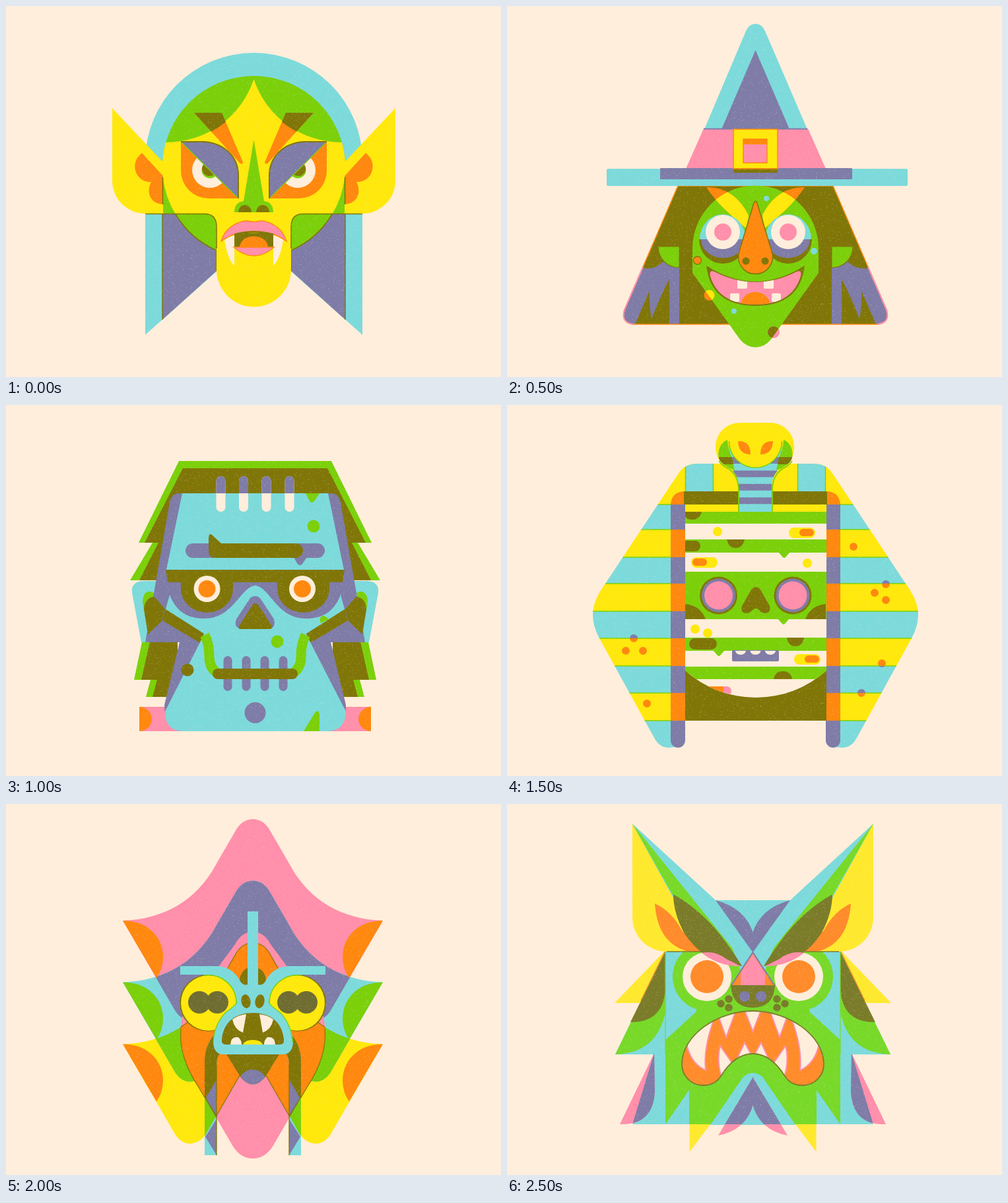
Animation of 750x563 px, one loop 3000 ms. Source, as an HTML page with a canvas:

```html
<!DOCTYPE html>
<html lang="en">
<head>
<meta charset="utf-8">
<title>Monster masks</title>
<style>
html, body { margin: 0; width: 100%; height: 100%; overflow: hidden; background: #ffeedb; }
canvas { display: block; }
</style>
</head>
<body>
<canvas id="stage" width="750" height="563"></canvas>
<script>
const g = document.getElementById('stage').getContext('2d');
const W = 750, H = 563, HOLD = 500;
const cream = '#ffeedb', cyan = '#7ddadb', yellow = '#ffe80c', pink = '#ff8fab';
const orange = '#ff880f', green = '#7bd00a', violet = '#7f7ca8', olive = '#807608';

const asPath = d => typeof d === 'string' ? new Path2D(d) : d;
const fill = (color, d) => { g.fillStyle = color; g.fill(asPath(d)); };
const line = (color, width, d) => { g.strokeStyle = color; g.lineWidth = width; g.stroke(asPath(d)); };
const oval = (color, x, y, rx, ry = rx, turn = 0) => {
  g.fillStyle = color;
  g.beginPath();
  g.ellipse(x, y, rx, ry, turn, 0, 7);
  g.fill();
};
const box = (color, x, y, x2, y2, r = 0) => {
  g.fillStyle = color;
  g.beginPath();
  g.roundRect(x, y, x2 - x, y2 - y, r);
  g.fill();
};
const pill = (color, x, y, x2, y2) => box(color, x, y, x2, y2, Math.min(x2 - x, y2 - y) / 2);
const within = (d, draw) => { g.save(); g.clip(asPath(d)); draw(); g.restore(); };
const both = (axis, draw) => {
  draw();
  g.save();
  g.translate(axis * 2, 0);
  g.scale(-1, 1);
  draw();
  g.restore();
};

function vampire() {
  const ax = 375.5;
  fill(cyan, 'M211 499V235A164.5 164 0 0 1 540 235V499L431 402H320Z');
  both(ax, () => {
    fill(violet, 'M237 245V476L319 402V300Z');
    line(olive, 1.5, 'M237 316V476M319 368V402');
  });
  oval(green, ax, 244.5, 138.5);
  both(ax, () => {
    line(olive, 1.5, 'M256.3 315A138.5 138.5 0 0 0 320 371.4');
    fill(green, 'M237 240H260V315H237Z');
    fill(yellow, 'M161 155L238 237V315H211A50 50 0 0 1 161 265Z');
    fill(orange, 'M206 223L238 258V301C218 300 212 282 220 267C196 268 186 238 206 223Z');
  });
  fill(yellow, 'M375.5 111A140 140 0 0 1 242 207A138.5 138.5 0 0 0 256.3 315H300Q319 315 319 335V400' +
    'A56.5 56.5 0 0 0 432 400V335Q432 315 451 315H494.7A138.5 138.5 0 0 0 509 207A140 140 0 0 1 375.5 111Z');
  both(ax, () => {
    line(olive, 1.5, 'M237.5 260V301M211 315.5H300Q319 315 319 335V368');
    const brow = 'M285 162H327L359 237Q358 242 354 238Z';
    fill(orange, brow);
    within(brow, () => oval(olive, 245, 67, 140));
    fill(orange, 'M265 206V250A42 42 0 0 0 307 292H352Z');
    oval(cream, 309, 249, 27);
    oval(green, 309, 249, 12.5);
    oval(olive, 308, 247, 11);
    fill(violet, 'M265 206H300C330 208 352 228 352 257V292Z');
    line(olive, 2, 'M265 206H300C330 208 352 228 352 257V292');
    line(green, 1.2, 'M266 207L351 291');
  });
  fill(green, 'M375.5 203L391 296Q405 298 405 313H346Q346 298 360 296Z');
  both(ax, () => fill(olive, 'M352 313A10 11 0 0 1 372 313Z'));
  box(olive, 346, 345, 405, 367);
  fill(orange, 'M354 366C355 344 396 344 397 366Z');
  const lip = 'M326 357C331 338 350 326 366 326Q375.5 329 385 326C401 326 420 338 425 357' +
    'Q405 342 375.5 342Q346 342 326 357Z';
  const lower = 'M345 366H406Q392 379 375.5 379Q359 379 345 366Z';
  both(ax, () => fill(cream, 'M331 355Q338 350 346 348V394Q336 385 331 355Z'));
  for (const d of [lip, lower]) { fill(pink, d); line(orange, 1.4, d); }
  line(olive, 3, 'M346 347Q360 343 375.5 343Q391 343 405 347');
}

function witch() {
  const ax = 376.5;
  const hair = 'M259 273H494L575 461Q581 481 561 483H192Q172 481 178 461Z';
  const face = 'M281 368A95.5 95.5 0 0 1 472 368V405L400 506Q390 518 376.5 518Q363 518 353 506L281 405Z';
  fill(olive, hair);
  within(hair, () => both(ax, () => {
    fill(violet, 'M150 398H206Q225 400 237 388Q248 398 261 397V490H150Z');
    fill(olive, 'M194 483L216 432Q215 455 219 475Q232 440 246 415V483Z');
  }));
  line(orange, 1.6, hair);
  both(ax, () => {
    line(pink, 2, 'M206 396L178 461Q172 481 192 483');
    const ear = 'M229 365H261V397A32 32 0 0 1 229 365Z';
    fill(green, ear);
    line(olive, 1, ear);
  });

  fill(cyan, 'M299 187L362 38Q367 27 376.5 27Q386 27 391 38L455 187Z');
  fill(violet, 'M376.5 67L428 187H325Z');
  fill(pink, 'M298 186H456L483 247H271Z');
  line(violet, 2, 'M298 186.5H455');
  box(cyan, 151, 247, 607, 273, 2);
  box(violet, 232, 246, 523, 263, 1);
  box(yellow, 343, 187, 410, 247);
  box(olive, 343, 246, 410, 253);
  box(pink, 358, 202, 394, 238);
  box(orange, 358, 202, 394, 210);
  line(orange, 1.5, 'M343 187H410V247H343ZM358 202H394V238H358Z');

  fill(green, face);
  both(ax, () => {
    const brow = 'M302 275C328 274 352 288 366 318L363 338C340 318 318 300 302 275Z';
    fill(orange, brow);
    within(brow, () => oval(yellow, ax, 368, 95.5));
    fill(olive, 'M291 354A36 37 0 0 0 363 354Z');
    fill(violet, 'M294 354A33 28 0 0 0 361 354Z');
    fill(cyan, 'M292 354A35 38 0 0 1 362 354Z');
    oval(cream, 327, 343, 26);
    oval(pink, 327, 343, 13);
  });
  const nose = 'M374 299Q376.5 293 379 299L401 372A26 26 0 1 1 352 372Z';
  fill(orange, nose);
  line(olive, 1.5, nose);
  both(ax, () => oval(olive, 362, 387, 5.5));

  fill(olive, 'M302 394Q340 418 376.5 418Q413 418 451 394Q444 455 376.5 455Q309 455 302 394Z');
  const mouth = 'M314 403Q345 419 376.5 419Q408 419 439 403Q447 400 445 410Q432 453 376.5 453Q321 453 308 410Q306 400 314 403Z';
  fill(pink, mouth);
  within(mouth, () => {
    oval(orange, ax, 454, 22, 20);
    both(ax, () => {
      box(cream, 349, 415, 364, 429, 2);
      box(cream, 338, 436, 352, 449, 2);
    });
  });
  oval(orange, 288.5, 386, 6);
  line(olive, 1.3, 'M282.5 386a6 6 0 1 0 12 0a6 6 0 1 0 -12 0');
  oval(orange, 306.5, 439, 8);
  within(face, () => oval(yellow, 306.5, 439, 8));
  oval(pink, 404, 495, 9);
  within(face, () => oval(olive, 404, 495, 9));
  oval(cyan, 393, 292, 4);
  oval(cyan, 465, 372, 5);
  oval(cyan, 344, 463, 4);
}

function stitchedGiant() {
  const ax = 377.5;
  fill(green, 'M262 85H493L554 209H533L567 266H188L222 209H201Z');
  fill(olive, 'M268 96H487L545 209H524L553 266H202L231 209H210Z');
  both(ax, () => {
    fill(green, 'M207 355L194 417H219L212 443H250V355Z');
    fill(olive, 'M219 355L205 417H229L222 443H260V355Z');
    box(pink, 202, 458, 264, 495, 1);
    fill(orange, 'M202 458A19 18.5 0 0 1 202 495Z');
    fill(cyan, 'M235 267H208Q189 268 191 285L205 360H240Z');
    fill(green, 'M211 322L207 300Q207 283 218 283Q226 284 230 294Z');
  });
  fill(violet, 'M262 134H493Q504 134 507 148L544 360H492L515 455Q515 495 486 495H269Q240 495 240 455L263 360H211L248 148Q251 134 262 134Z');
  both(ax, () => {
    fill(olive, 'M209 310Q210 292 225 291L241 310L236 328L215 348Z');
    fill(olive, 'M242 309L301 346L294 361L237 327Z');
  });
  fill(cyan, 'M267 134H488L512 250H243Z');
  fill(cyan, 'M248 288C258 314 275 324 301 324C345 324 355 276 377.5 274C400 276 410 324 454 324' +
    'C480 324 497 314 507 288L513 310L455 347L461 360L515 465Q514 495 486 495H269Q241 495 241 465L294 360L300 347L242 310Z');
  fill(olive, 'M242 250H513L510 269H245Z');
  for (const x of [325.5, 360, 394.5, 429.5]) {
    pill(cream, x - 7, 108, x + 7, 162);
    within('M300 100H460V134H300Z', () => pill(violet, x - 7, 108, x + 7, 162));
  }
  pill(violet, 272, 210, 483, 232);
  fill(violet, 'M436 231H456L449 241Q445 246 441 240Z');
  fill(olive, 'M307 222V201Q308 193 313 198L326 210H439A11 11 0 0 1 439 232H318Q307 232 307 222Z');
  both(ax, () => {
    fill(olive, 'M265 262H344V279A39.5 36 0 0 1 265 279Z');
    line(green, 15, 'M301 349Q308 362 308 383Q308 400 323 409');
  });
  for (const x of [304.5, 449]) {
    oval(cream, x, 279, 20);
    oval(orange, x, 279, 13);
  }
  fill(violet, 'M377.5 290Q384 290 387 296L406 325Q410 340 395 340H360Q344 340 349 325L368 296Q371 290 377.5 290Z');
  fill(olive, 'M377.5 301Q381 301 384 306L402 334Q404 340 400 340H355Q351 340 354 334L372 306Q374 301 377.5 301Z');
  for (let x = 336; x < 430; x += 28) pill(violet, x - 6.5, 381, x + 6.5, 434);
  pill(olive, 313, 400, 442, 416);
  oval(violet, ax, 467, 16);

  oval(green, 466, 184, 9.5);
  oval(green, 411, 359, 9.5);
  oval(olive, 275, 402, 9.5);
  fill(green, 'M454 134H475L467 146Q463 150 460 146Z');
  fill(green, 'M476 331V323Q480 317 485 322L490 325Z');
  fill(green, 'M451 495L468 467Q474 461 475 470V495Z');
}

function mummy() {
  const ax = 376.5;
  const cloth = 'M290 89H463Q483 89 492 102L604 271Q623 297 623 318Q623 336 613 354L530 505Q522 520 508 520' +
    'Q484 519 484 497V131H270V497Q270 519 245 520Q231 520 223 505L140 354Q130 336 130 318Q130 297 149 271L261 102Q270 89 290 89Z';
  const edges = [151, 189, 231, 271, 313, 354, 396, 437, 479, 521];
  const stripes = (a, b) => {
    box(a, 120, 80, 640, 151);
    for (let i = 0; i < 9; i++) box(i % 2 ? a : b, 120, edges[i], 640, edges[i + 1]);
  };
  within(cloth, () => {
    stripes(yellow, cyan);
    both(ax, () => {
      box(cyan, 270, 80, 312, 135);
      line(green, 1.5, 'M270.5 80V131M312.5 80V131');
    });
    for (const y of edges) line(green, 1.5, `M120 ${y}H640`);
  });
  const overprint = new Path2D('M270 131V509A11 11 0 0 1 248 509V150Q250 131 270 131Z' +
    'M483 131V509A11 11 0 0 0 505 509V150Q503 131 483 131Z');
  for (const [x, y] of [[525, 215], [557, 285], [574, 296], [574, 272], [568, 392],
    [537, 437], [192, 354], [180, 373], [206, 373], [212, 453]]) {
    overprint.moveTo(x + 6, y);
    overprint.arc(x, y, 6, 0, 7);
  }
  within(overprint, () => stripes(orange, violet));
  box(olive, 268, 131, 485, 151);
  box(yellow, 270, 151, 484, 163);
  box(olive, 270, 162, 484, 479);

  within('M270 162H484V403A160 160 0 0 1 270 403Z', () => {
    box(cream, 270, 162, 484, 450);
    for (const [y, y2] of [[162, 180], [204, 224], [253, 325], [353, 373], [397, 416]]) box(green, 270, y, 484, y2);
    fill(olive, 'M270 162H295Q292 174 281 174Q273 174 270 170Z');
    pill(olive, 258, 206, 293, 222);
    fill(olive, 'M333 204H360Q357 217 346 217Q336 217 333 204Z');
    fill(olive, 'M424 353H450Q448 366 437 366Q426 366 424 353Z');
    fill(olive, 'M404 416H432Q430 404 418 404Q406 404 404 416Z');
    pill(olive, 276, 354, 318, 371);
    for (const [x, y] of [[319, 192], [455, 240], [285, 340], [304, 346]]) oval(yellow, x, y, 7);
    for (const [x, y, dx] of [[427, 186, 16], [279, 231, 2], [435, 378, 16]]) {
      pill(yellow, x, y, x + 40, y + 16);
      pill(orange, x + dx, y + 2, x + dx + 22, y + 13);
    }
    for (const [x, y] of [[420, 223], [419, 324], [321, 372]]) fill(green, `M${x - 9} ${y}h18l-7 8q-2 2 -4 0Z`);
    pill(pink, 290, 427, 340, 441);
    box(orange, 290, 427, 328, 441);
    both(ax, () => fill(olive, 'M270 302Q293 304 301 325H270Z'));
  });
  for (const x of [320.5, 433]) {
    oval(olive, x, 289, 28.5);
    oval(violet, x, 289, 25.5);
    oval(pink, x, 289, 21.5);
  }
  fill(olive, 'M377 276Q382 276 385 282L398 305Q400 316 391 316Q385 316 382 311Q377 306 372 311Q368 316 362 316Q353 315 356 305L369 282Q372 276 377 276Z');
  box(violet, 341, 372, 412, 389, 2);
  for (const x of [354, 376.5, 399]) fill(cream, `M${x - 8} 373a8 6 0 0 0 16 0Z`);

  // Cobra
  fill(yellow, 'M352 27H401A36 36 0 0 1 435 63C435 88 420 92 410 100Q401 110 401 130V151H351V130Q351 110 343 100C330 92 317 88 316 63A36 36 0 0 1 352 27Z');
  const neck = 'M336 62H417L415 85Q412 98 406 105Q401 112 401 130V162H351V130Q351 112 346 105Q340 98 338 85Z';
  fill(cyan, neck);
  within(neck, () => {
    for (let y = 79; y < 150; y += 20.4) box(violet, 330, y, 420, y + 10);
  });
  both(ax, () => {
    const side = 'M334 53C320 58 317 78 324 86Q332 95 345 99L341 80Q335 68 334 53Z';
    fill(green, side);
    within(side, () => box(olive, 310, 79, 350, 90));
    line(green, 1.8, 'M321 85Q327 93 336 97Q351 107 351 130V162');
  });
  fill(yellow, 'M336.5 50V55A40 40 0 0 0 416.5 55V50Z');
  line(green, 1.5, 'M336.5 55A40 40 0 0 0 416.5 55');
  both(ax, () => fill(orange, 'M350 55Q369 54 369 75Q351 75 350 55Z'));
}

function swampCreature() {
  const ax = 374, pupil = '#706d32';
  const tent = y => {
    const p = new Path2D();
    p.addPath(new Path2D('M177 177C240 175 290 145 318 92L347 42Q357 23 374 23Q391 23 401 42L430 92C458 145 508 175 571 177' +
      'L491 315Q482 328 469 328Q455 327 446 315L374 190L302 315Q293 327 279 328Q266 328 257 315Z'), { f: y });
    return p;
  };
  const leaf = (color, y) => both(ax, () =>
    fill(color, `M177 ${177 + y}C218 ${177 + y} 238 ${205 + y} 238 ${232 + y}Q238 ${250 + y} 228 ${264 + y}Z`));
  const back = tent(0), middle = tent(93.5), front = tent(187.5);
  fill(pink, back);
  fill(yellow, front);
  fill(cyan, middle);
  within(middle, () => {
    fill(violet, back);
    fill(green, front);
  });
  leaf(orange, 0);
  leaf(green, 93.5);
  leaf(orange, 187.5);

  const body = 'M374 194Q357 194 347 213L268 320C258 355 268 395 292 430L343 518Q355 538 374 538' +
    'Q393 538 405 518L456 430C480 395 490 355 480 320L401 213Q391 194 374 194Z';
  fill(pink, body);
  both(ax, () => fill(pink, 'M347 213L325 247H345V220Z'));
  within(body, () => {
    fill(orange, front);
    line(olive, 1.2, front);
  });
  both(ax, () => {
    line(olive, 1.2, 'M265 340C262 370 272 400 292 430L319 476');
    const cord = 'M301 533V390Q302 365 316 350H324V378Q319 385 319 395V533Z';
    fill(cyan, cord);
    within(cord, () => {
      fill(green, front);
      fill(violet, body);
      within(body, () => fill(olive, front));
      fill(violet, 'M319 418L303 446L319 473ZM319 478L302 505L319 533Z');
    });
    line(olive, 1.3, 'M319 395V533');
  });
  oval(olive, ax, 268, 20, 21);
  const chin = 'M333 378H415L393 414Q374 437 355 414Z';
  fill(olive, chin);
  within(chin, () => oval(violet, ax, 421, 20, 18));

  both(ax, () => fill(cyan,
    'M264 246H316C338 246 348 256 355 269Q359 276 366 274V163H374.5V312H345L300 262V259H264Z'));
  both(ax, () => {
    oval(olive, 306, 302, 43);
    oval(yellow, 307, 302, 42);
    line(green, 1.5, 'M300 260.5A42 42 0 0 1 349 302');
    oval(pupil, 293, 301, 17);
    oval(pupil, 320, 301, 17);
  });
  fill(cyan, 'M350 300H398Q400 306 415 316Q434 335 435 362Q434 380 418 380H330Q315 380 314 362Q315 335 333 316Q348 306 350 300Z');
  both(ax, () => line(green, 1.2, 'M350 300Q348 306 333 316Q315 335 314 362'));
  fill(olive, 'M327 357C330 330 348 317 374 317S418 330 421 357Q422 365 415 365H333Q326 365 327 357Z');
  both(ax, () => {
    oval(olive, 363.5, 299.5, 7, 10.5, -0.2);
    fill(cream, 'M343 327Q352 320 364 319L359 347Q346 342 343 327Z');
    fill(cream, 'M340 365Q341 352 352 354Q357 358 357 365Z');
  });
  fill(yellow, 'M359 365Q362 358 374 358Q386 358 389 365Z');
}

function werewolf() {
  // This print has a thinner yellow ink.
  const yellow = '#ffe92f', orange = '#ff8b2b', green = '#78d929', olive = '#7b7c2a';
  const ax = 372.5;
  both(ax, () => fill(yellow, 'M238 224L163 302H215Z'));
  fill(cyan, 'M190 30L316 146H429L555 30L505 224L581 380H523L555 486H190L222 380H164L240 224Z');
  both(ax, () => {
    fill(yellow, 'M190 30V172A52 52 0 0 0 242 224H297Z');
    fill(green, 'M190 30L360 242L300 224Z');
    fill(green, 'M240 224L164 380Q228 378 240 315Z');
    fill(olive, 'M240 224L187 331Q236 332 240 282Z');
    line(green, 1.2, 'M240 224V380');
    line(orange, 1.2, 'M239 224L203 298');
    const tuft = 'M223 378L171 486Q222 488 224 435Z';
    fill(pink, tuft);
    within(tuft, () => fill(violet, 'M223 378L190 486H226V378Z'));
  });

  fill(green, 'M240 358L286 316L303 262H442L459 316L505 358V486L469 434V486H276V434L240 486Z');
  both(ax, () => {
    fill(yellow, 'M276.5 486V528L308 486Z');
    within('M240 224H372.5V330H240Z', () => oval(green, 303, 262, 52));
  });
  fill(cyan, 'M308 487L358 414Q372.5 402 387 414L437 487Z');
  both(ax, () => {
    const tuft = 'M373 414L320 503Q362 495 373 456Z';
    fill(pink, tuft);
    within(tuft, () => box(violet, 300, 410, 373, 486));
  });
  fill(cyan, 'M340 215H405L390 255H355Z');
  both(ax, () => {
    oval(cream, 303, 262, 37);
    oval(orange, 303, 262, 25);
    fill(orange, 'M224 151Q250 163 265 192L296 224H275Q228 212 224 151Z');
    fill(olive, 'M252 137Q298 163 331 209Q346 229 356 246Q300 245 268 195Q252 165 252 137Z');
    fill(pink, 'M295 226Q315 222 332 235L354 246Q322 247 295 226Z');
    line(olive, 1.5, 'M242 224H296');
    fill(violet, 'M316 146Q361 158 373 196V226Z');
  });
  fill(orange, 'M372.5 226L340 276H405Z');
  fill(pink, 'M372.5 228L354 256V275H391V256Z');
  line(violet, 2, 'M340 275L372.5 225L405 275');
  fill(olive, 'M339 275H406Q404 309 372.5 309Q341 309 339 275Z');
  both(ax, () => {
    oval(violet, 360, 292, 8);
    for (const [x, y] of [[324, 303], [336, 296], [336, 309]]) oval(olive, x, y, 5.8);
  });

  const mouth = 'M265 395C265 350 320 314 372.5 314C425 314 480 350 480 395A32 32 0 0 1 448 427Q430 427 421 413' +
    'Q400 379 372.5 379Q345 379 324 413Q315 427 297 427A32 32 0 0 1 265 395Z';
  fill(orange, mouth);
  within(mouth, () => {
    const tooth = d => { fill(cream, d); line(pink, 2, d); };
    tooth('M357 305L372.5 345L388 305Z');
    both(ax, () => {
      tooth('M270 371Q285 335 315 323Q297 370 301 404Q280 395 273 368Z');
      tooth('M319 318L332 354L348 310Z');
      tooth('M326 418Q317 390 323 367L341 393Z');
      tooth('M347 390L360 362L371 382Z');
    });
  });
  line(olive, 1.8, mouth);
}

function grain() {
  let seed = 7;
  const random = () => (seed = seed * 16807 % 2147483647) / 2147483647;
  g.save();
  g.globalCompositeOperation = 'source-atop';
  g.fillStyle = 'rgba(255, 238, 219, 0.22)';
  for (let i = 0; i < 16000; i++) g.fillRect(Math.floor(random() * W), Math.floor(random() * H), 1, 1);
  g.restore();
}

const masks = [vampire, witch, stitchedGiant, mummy, swampCreature, werewolf];
const start = performance.now();
let shown = -1;

function tick() {
  const index = Math.floor((performance.now() - start) / HOLD) % masks.length;
  if (index !== shown) {
    shown = index;
    g.clearRect(0, 0, W, H);
    masks[index]();
    grain();
  }
  requestAnimationFrame(tick);
}
tick();
</script>
</body>
</html>
```
